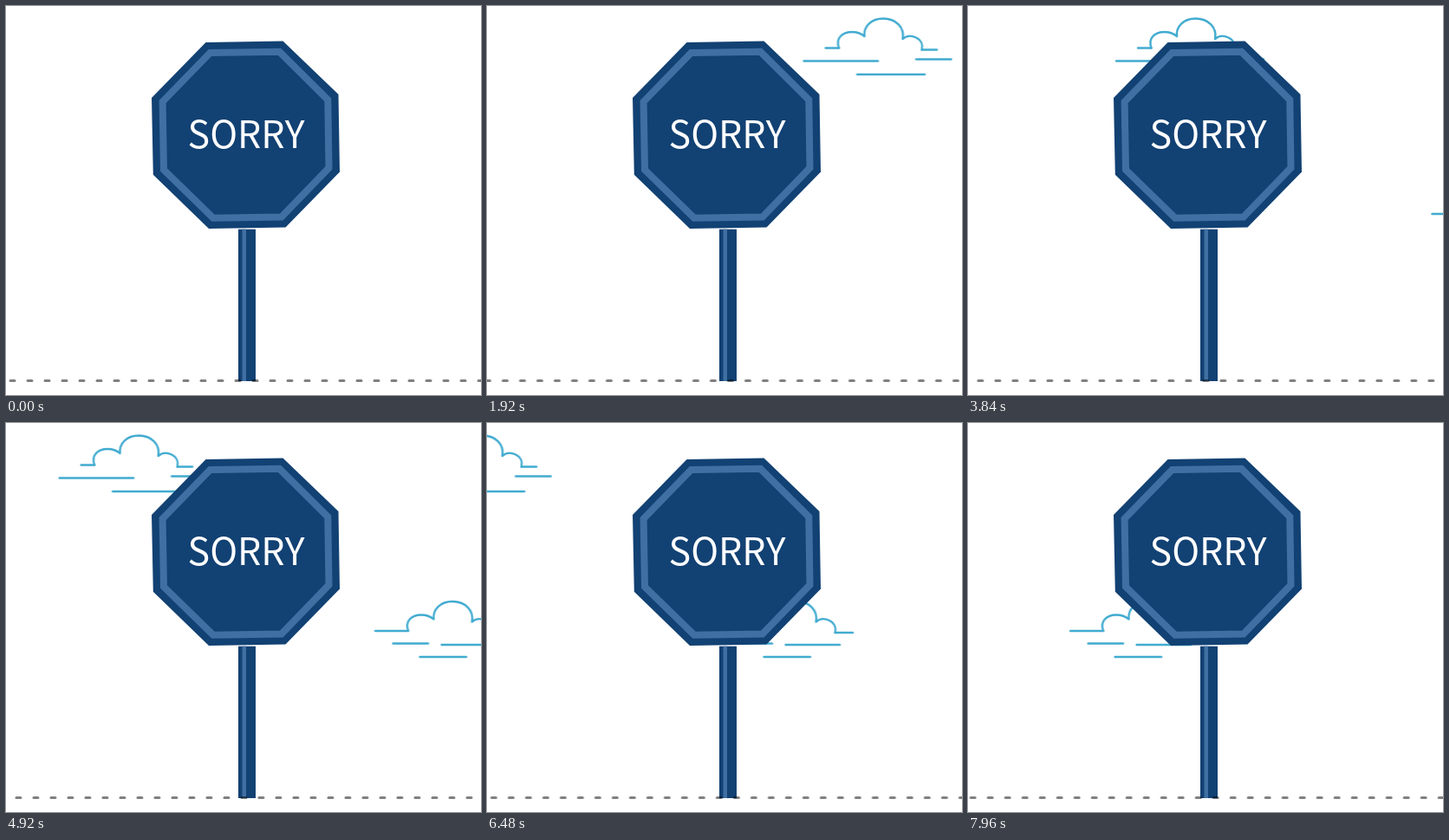
These frames come from a looping animation (548 px wide and 449 px high, 8 s). An HTML page:

```html
<!DOCTYPE html>
<html lang="en">
<head>
<meta charset="utf-8">
<title>Sorry sign</title>
<style>
  html, body { margin: 0; width: 100%; height: 100%; overflow: hidden; background: #fff; }
  svg { display: block; width: 548px; height: 449px; }
  .cloud { fill: none; stroke: #41abd0; stroke-width: 2.4; stroke-linecap: round; stroke-linejoin: round; }
  .road { fill: none; stroke: #808080; stroke-width: 3; stroke-linecap: round; stroke-dasharray: 5 15; mix-blend-mode: multiply; }
  .dark { fill: #124173; }
  .light { fill: #4070a3; }
  .rim { fill: none; stroke: #4070a3; stroke-width: 8; }
  text { font: 500 43px "Noto Sans CJK JP", "Noto Sans CJK SC", "Noto Sans CJK", "Open Sans", sans-serif; fill: #fff; text-anchor: middle; }
</style>
</head>
<body>
<svg viewBox="0 0 548 449">
  <defs>
    <path id="puff" d="M406 48.5C402 38 409 30 421 30C427 30 432 32 435.5 35C434 24 443 14.5 457 14.5C472 14.5 482 25 479.5 38C484 34 490 34 495 36.5C501 39.5 503 45 501.5 50.5"/>
  </defs>

  <g id="sky" class="cloud">
    <g transform="translate(194.5 0)">
      <use href="#puff"/>
      <path d="M390.5 48.5H406M501.5 50.5H519M365.5 63.5H451M495 61.5H535.5M427 79H505"/>
    </g>
    <g transform="translate(498.4 0)">
      <use href="#puff" x="58" y="191.5"/>
      <path d="M426 240H464M559.5 242H580M446.5 254.5H487M502.5 256H565M477.5 270H531"/>
    </g>
  </g>

  <rect class="dark" x="268" y="257.7" width="20" height="175.3"/>
  <rect class="light" x="272.5" y="257.7" width="4.5" height="175.3"/>
  <path class="dark" d="M230.5 42L319.5 40.5L383.5 102L385 191.5L322.5 255.5L234 257L169.8 194.8L168 106Z"/>
  <path class="rim" d="M235.5 54L315.5 52.8L371.3 108.3L372.5 186.8L317.8 243.5L239 244.7L182 189L180.6 110.5Z"/>
  <text x="277" y="163.7">SORRY</text>

  <path id="road" class="road" d="M-15 432.5H1100"/>
</svg>
<script>
  const duration = 8000, steps = duration / 40;

  // Speeds are in pixels per millisecond, leftwards.
  function drift(id, speed) {
    document.getElementById(id).animate(
      { transform: ["translateX(0px)", `translateX(${-speed * duration}px)`] },
      { duration, iterations: Infinity, easing: `steps(${steps}, end)` }
    );
  }

  drift("sky", 0.1013);
  drift("road", 0.0555);
</script>
</body>
</html>
```
